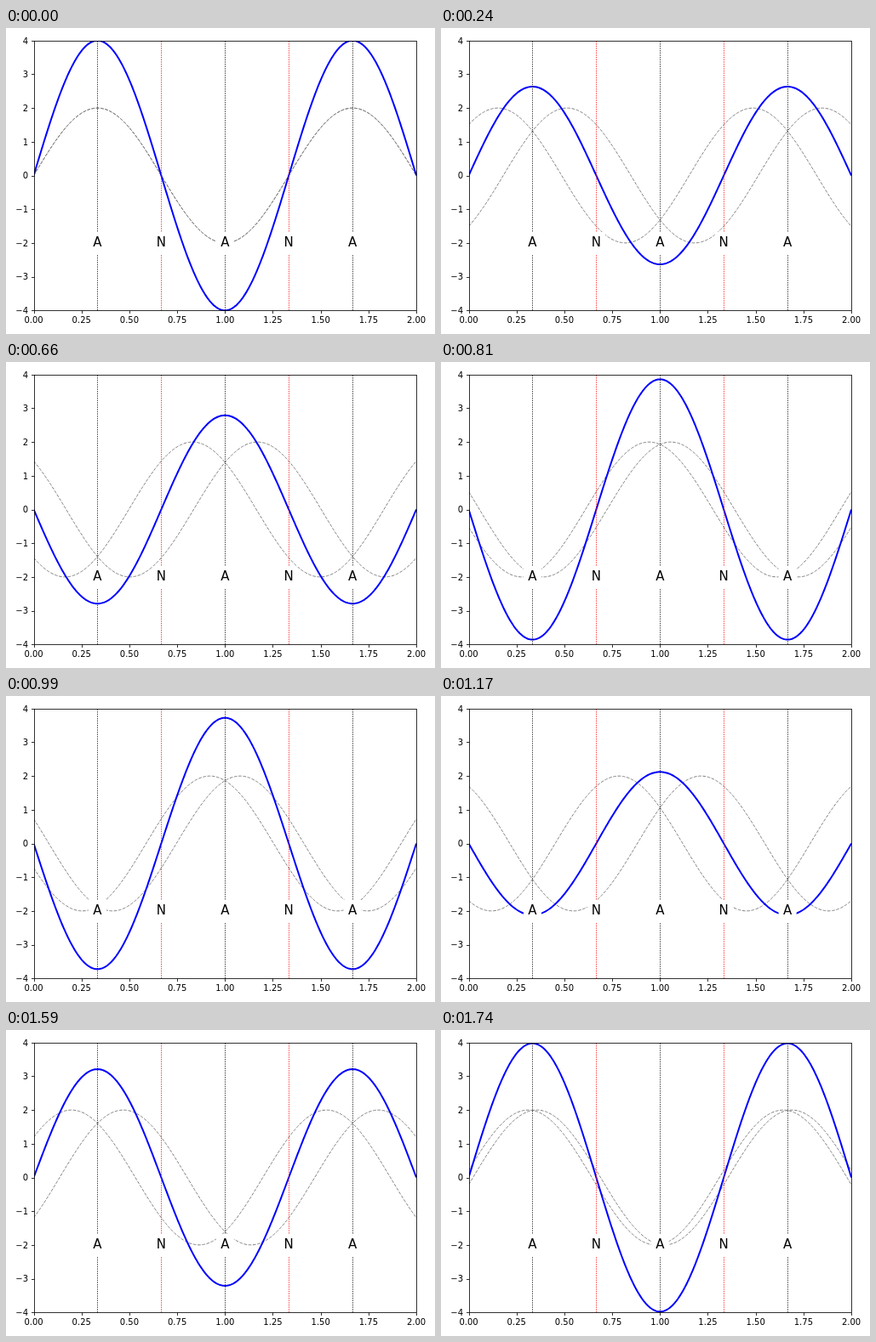
An HTML page with a canvas that plays this animation: 504x360 px, repeating every 1770 ms.

```html
<!DOCTYPE html>
<html lang="en">
<head>
<meta charset="utf-8">
<title>Standing wave</title>
<style>
html, body { margin: 0; width: 504px; height: 360px; overflow: hidden; background: #fff; }
canvas { display: block; }
</style>
</head>
<body>
<canvas id="c" width="504" height="360"></canvas>
<script>
const g = document.getElementById('c').getContext('2d');
const STEPS = 59, STEP_MS = 30;
const FONT = '"DejaVu Sans", sans-serif';
const left = 32.55, right = 482.05, top_ = 14.8, bottom = 332.2;

const px = x => left + x / 2 * (right - left);
const py = y => (top_ + bottom) / 2 - y / 8 * (bottom - top_);
const snap = v => Math.floor(v + 0.5) + 0.5;

function style(color, width, dash = []) {
  g.strokeStyle = color;
  g.lineWidth = width;
  g.setLineDash(dash);
}

function line(x1, y1, x2, y2) {
  g.beginPath();
  g.moveTo(x1, y1);
  g.lineTo(x2, y2);
  g.stroke();
}

function curve(f) {
  g.beginPath();
  for (let i = 0; i <= 400; i++) g.lineTo(px(i / 200), py(f(i / 200)));
  g.stroke();
}

function label(text, x, y, size, align) {
  g.fillStyle = '#000';
  g.font = size + 'px ' + FONT;
  g.textAlign = align;
  g.fillText(text, x, y);
}

function axes() {
  const l = snap(left), r = snap(right), t = snap(top_), b = snap(bottom);
  style('#000', 0.8);
  g.strokeRect(l, t, r - l, b - t);
  for (let i = 0; i <= 8; i++) {
    const x = px(i / 4), y = py(i - 4);
    line(snap(x), b, snap(x), b + 3.5);
    line(l, snap(y), l - 3.5, snap(y));
    label((i / 4).toFixed(2), x, 347, 10, 'center');
    label(String(i - 4).replace('-', '\u2212'), 26, y + 3.8, 10, 'right');
  }
}

function draw(phase) {
  const k = 1.5 * Math.PI;
  g.fillStyle = '#fff';
  g.fillRect(0, 0, 504, 360);

  g.save();
  g.beginPath();
  g.rect(33, 15, 450, 318);
  g.clip();
  style('#808080', 1, [3.7, 1.6]);
  curve(x => 2 * Math.sin(k * x - phase));
  curve(x => 2 * Math.sin(k * x + phase));
  style('#00f', 2);
  curve(x => 4 * Math.sin(k * x) * Math.cos(phase));

  // antinodes and nodes
  for (let i = 1; i <= 5; i++) {
    const node = i % 2 === 0, x = px(i / 3);
    style(node ? '#f00' : '#000', 0.75, [1.4, 1.25]);
    line(snap(x), bottom, snap(x), top_);
    g.fillStyle = '#fff';
    g.fillRect(x - 10.5, 240, 21, 26);
    label(node ? 'N' : 'A', x, 257, 15, 'center');
  }
  g.restore();
  axes();
}

function tick() {
  const n = Math.floor(performance.now() / STEP_MS) % STEPS;
  draw(2 * Math.PI * n / STEPS);
  requestAnimationFrame(tick);
}
tick();
</script>
</body>
</html>
```
